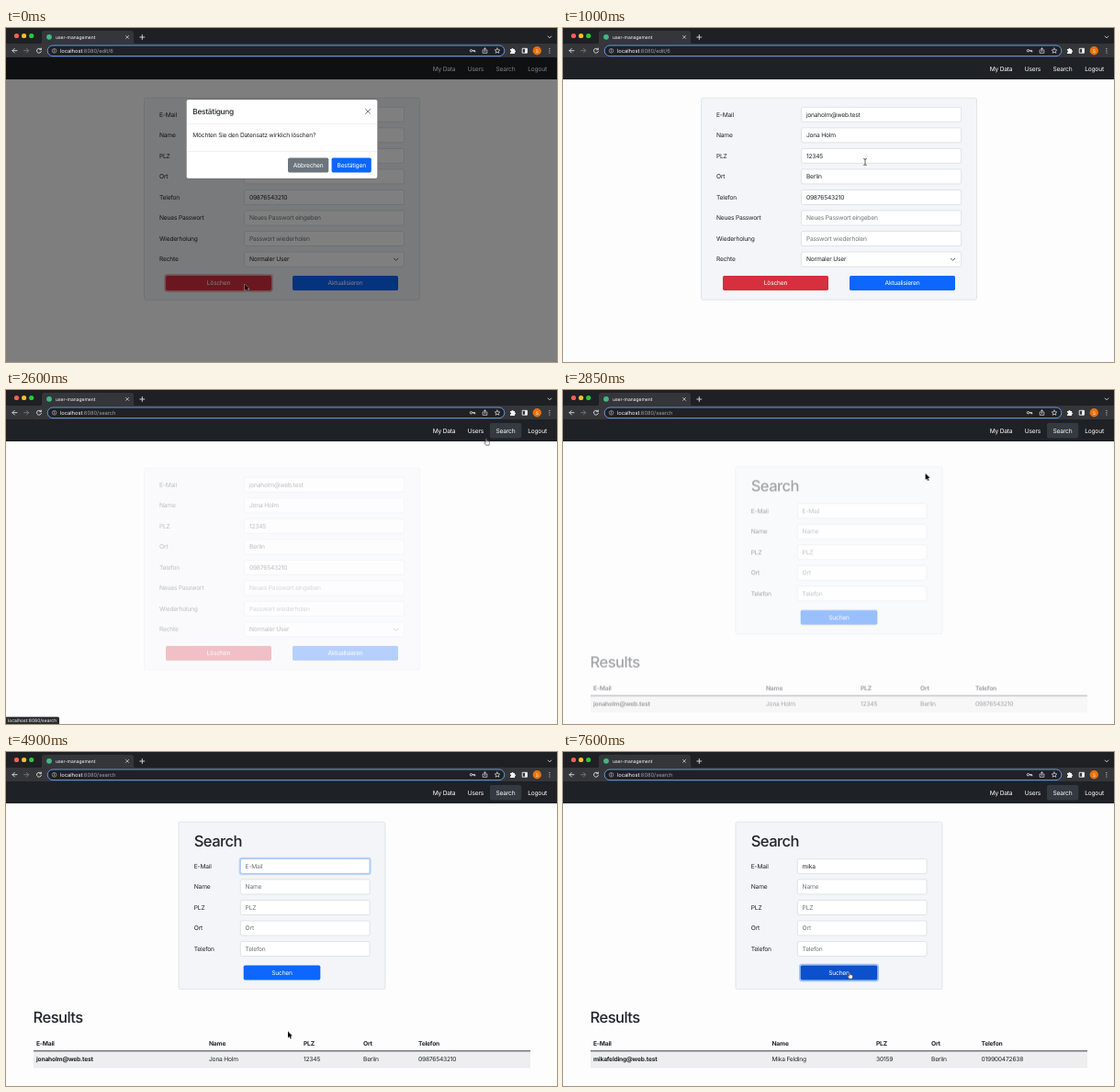
These frames come from a looping animation (600 px wide and 364 px high, 8 s). An HTML page:

```html
<!DOCTYPE html>
<html lang="de">
<head>
<meta charset="utf-8">
<title>user-management</title>
<style>
html, body { margin: 0; width: 100%; height: 100%; overflow: hidden; background: #fdfdfe; }
svg { display: block; width: 600px; height: 364px; }
text { font: 6.66px Inter, "Open Sans", sans-serif; letter-spacing: -.03em; fill: #212529; text-rendering: geometricPrecision; white-space: pre; }
.mid { text-anchor: middle; }
.white { fill: #fff; }
.hint { fill: #6c757d; }
.bold { font-weight: 700; }
.head { font-size: 16.6px; font-weight: 500; letter-spacing: -.035em; }
.title { font-size: 8.3px; font-weight: 500; }
.tiny { font-size: 5px; letter-spacing: 0; }
.url { font-size: 5.8px; letter-spacing: -.01em; }
.card { fill: #f3f5f8; stroke: #d4d7db; stroke-width: .6; }
.field { fill: #fff; stroke: #ced4da; stroke-width: .6; }
.line { fill: none; stroke-linecap: round; stroke-linejoin: round; }

/* One shared 8 s clock: 1% = 80 ms */
.run, .cut { animation: 8s linear infinite; }
.cut { animation-timing-function: step-end; }

#modal { animation-name: modal; }
@keyframes modal { 0%, 10.9% { opacity: 1; visibility: visible } 12.3%, 100% { opacity: 0; visibility: hidden } }
#ring { animation-name: ring; }
@keyframes ring { 0%, 10.9% { opacity: 1 } 12.3%, 100% { opacity: 0 } }
#cancel { animation-name: cancel; }
@keyframes cancel { 0%, 7.4% { fill: #6c757d } 9.2%, 100% { fill: #5c636a } }

#edit { animation-name: edit; }
@keyframes edit {
  0%, 30.94% { opacity: 1; transform: none; animation-timing-function: ease }
  34.69%, 100% { opacity: 0; transform: translateY(12.5px) }
}
#search { animation-name: search; }
@keyframes search {
  0%, 34.69% { opacity: 0; transform: translateY(12.5px); animation-timing-function: ease }
  38.44%, 100% { opacity: 1; transform: none }
}
#tab { animation-name: tab; }
@keyframes tab { 0%, 28.6% { opacity: 0 } 30.5%, 100% { opacity: 1 } }
#status { animation-name: status; }
@keyframes status { 0%, 28.8% { opacity: 0 } 29.6%, 33.5% { opacity: 1 } 35.5%, 100% { opacity: 0 } }
#pathA { animation-name: pathA; }
@keyframes pathA { 0% { opacity: 1 } 30.9%, 100% { opacity: 0 } }
#pathB { animation-name: pathB; }
@keyframes pathB { 0% { opacity: 0 } 30.9%, 100% { opacity: 1 } }

#focus { animation-name: focus; }
@keyframes focus { 0%, 42.2% { opacity: 0 } 44.2%, 91.9% { opacity: 1 } 93.8%, 100% { opacity: 0 } }
#caret { animation-name: caret; }
@keyframes caret {
  0% { opacity: 0; transform: none }
  41.9% { opacity: 1 }
  48.75% { opacity: 0 }
  55% { opacity: 1 }
  61.25% { opacity: 0; transform: none }
  63.12% { opacity: 1; transform: translateX(6px) }
  64.38% { transform: translateX(7.6px) }
  65.8% { transform: translateX(11px) }
  67.1% { opacity: 1; transform: translateX(14.8px) }
  73.1% { opacity: 0 }
  79.4% { opacity: 1 }
  85.5%, 100% { opacity: 0; transform: translateX(14.8px) }
}
#hint { animation-name: hint; }
@keyframes hint { 0% { opacity: 1 } 63.12%, 100% { opacity: 0 } }
#k0 { animation-name: k0; }
#k1 { animation-name: k1; }
#k2 { animation-name: k2; }
#k3 { animation-name: k3; }
@keyframes k0 { 0% { fill-opacity: 0 } 63.12%, 100% { fill-opacity: 1 } }
@keyframes k1 { 0% { fill-opacity: 0 } 64.38%, 100% { fill-opacity: 1 } }
@keyframes k2 { 0% { fill-opacity: 0 } 65.8%, 100% { fill-opacity: 1 } }
@keyframes k3 { 0% { fill-opacity: 0 } 67.1%, 100% { fill-opacity: 1 } }

#go { animation-name: go; }
@keyframes go { 0%, 90% { fill: #0d66fd } 91.9%, 100% { fill: #0b50cc } }
#goRing { animation-name: goRing; }
@keyframes goRing { 0%, 91.9% { opacity: 0 } 93.8%, 100% { opacity: 1 } }
#rowA { animation-name: rowA; }
@keyframes rowA { 0% { opacity: 1 } 93.6%, 100% { opacity: 0 } }
#rowB { animation-name: rowB; }
@keyframes rowB { 0% { opacity: 0 } 93.6%, 100% { opacity: 1 } }

#cursor { animation-name: move; }
@keyframes move {
  0%, .4% { transform: translate(260px, 279px); animation-timing-function: ease-in-out }
  9.2%, 20.3% { transform: translate(329px, 146px); animation-timing-function: ease-in-out }
  29.4%, 31% { transform: translate(539px, 45px); animation-timing-function: ease-in }
  32.5% { transform: translate(523.5px, 52.5px); animation-timing-function: ease-out }
  40.6%, 52.3% { transform: translate(291.5px, 121.5px); animation-timing-function: ease-in-out }
  60.6%, 74.8% { transform: translate(307px, 304.5px); animation-timing-function: ease-in-out }
  83.5%, 85% { transform: translate(334px, 350px) }
  85.63% { transform: translate(334.5px, 345.3px); animation-timing-function: ease-in-out }
  91%, 100% { transform: translate(312px, 239.8px) }
}
#arrow { animation-name: arrow; }
@keyframes arrow {
  0% { opacity: 1 } 7.4% { opacity: 0 } 21.8% { opacity: 1 } 28.1% { opacity: 0 }
  33.2% { opacity: 1 } 38.6% { opacity: 0 } 53.9% { opacity: 1 } 63.12% { opacity: 0 }
  75% { opacity: 1 } 89.6%, 100% { opacity: 0 }
}
#hand { animation-name: hand; }
@keyframes hand {
  0% { opacity: 0 } 7.4% { opacity: 1 } 11.6% { opacity: 0 } 28.1% { opacity: 1 }
  33.2% { opacity: 0 } 89.6%, 100% { opacity: 1 }
}
#beam { animation-name: beam; }
@keyframes beam {
  0% { opacity: 0 } 11.6% { opacity: 1 } 21.8% { opacity: 0 } 38.6% { opacity: 1 } 53.9%, 100% { opacity: 0 }
}
</style>
</head>
<body>
<script>
const attrs = (id, cls) => (id ? ` id="${id}"` : '') + (cls ? ` class="${cls}"` : '');
const text = (x, y, s, cls = '', id = '') => `<text x="${x}" y="${y}"${attrs(id, cls)}>${s}</text>`;
const rect = (x, y, w, h, r, fill, cls = '', id = '') =>
  `<rect x="${x}" y="${y}" width="${w}" height="${h}" rx="${r}"${fill ? ` fill="${fill}"` : ''}${attrs(id, cls)}/>`;
const circle = (x, y, r, fill) => `<circle cx="${x}" cy="${y}" r="${r}" fill="${fill}"/>`;
const line = (d, color, w = .9) => `<path class="line" d="${d}" stroke="${color}" stroke-width="${w}"/>`;
const group = (id, cls, ...parts) => `<g${attrs(id, cls)}>${parts.join('')}</g>`;
const button = (x, y, w, label, fill, cls = '', id = '') =>
  rect(x, y, w, 16, 1.7, fill, cls, id) + text(x + w / 2, y + 10.4, label, 'mid white');
const ring = (x, y, w, h, color, id, cls) => `<rect x="${x - .8}" y="${y - .8}" width="${w + 1.6}" height="${h + 1.6}"
  rx="2.3" fill="none" stroke="${color}" stroke-width="1.7"${attrs(id, cls)}/>`;

const PITCH = 22.54;
const rows = (list, top, labelX, x, w) => list.map(([label, value, hint], i) => {
  const y = top + i * PITCH;
  return text(labelX, y + 2.4, label) + rect(x, y - 8, w, 16, 1.7, '', 'field') +
    (value ? text(x + 5.3, y + 2.4, value) : '') + (hint ? text(x + 5.3, y + 2.4, hint, 'hint') : '');
}).join('');

const cells = (y, xs, values, cls) => values.map((v, i) => text(xs[i], y, v, i ? cls : 'bold')).join('');
const result = (id, xs, values) => group(id, 'cut',
  cells(319.6, xs, ['E-Mail', 'Name', 'PLZ', 'Ort', 'Telefon'], 'bold'), cells(337.4, xs, values, ''));

const edit = group('edit', 'run',
  rect(150.5, 76.2, 300, 220, 2, '', 'card'),
  rows([
    ['E-Mail', 'jonaholm@web.test'], ['Name', 'Jona Holm'], ['PLZ', '12345'], ['Ort', 'Berlin'],
    ['Telefon', '09876543210'], ['Neues Passwort', '', 'Neues Passwort eingeben'],
    ['Wiederholung', '', 'Passwort wiederholen'], ['Rechte', 'Normaler User']
  ], 94.3, 167, 259.6, 174),
  line('M422.4 251.2l2.2 2.1 2.2-2.1', '#343a40', .8),
  ring(174, 270, 115, 16, '#e9a3aa', 'ring', 'run'),
  button(174, 270, 115, 'Löschen', '#d62f3e'),
  button(312, 270, 115, 'Aktualisieren', '#0d66fd'));

const typed = [...'mika'].map((c, i) => `<tspan id="k${i}" class="cut">${c}</tspan>`).join('');
const search = group('search', 'run',
  rect(188, 76.2, 225, 182.5, 2, '', 'card'),
  text(204.7, 102.8, 'Search', 'head'),
  rows([['E-Mail'], ['Name', '', 'Name'], ['PLZ', '', 'PLZ'], ['Ort', '', 'Ort'], ['Telefon', '', 'Telefon']],
    124.4, 204.8, 255.3, 140.7),
  group('focus', 'run', ring(255.3, 116.4, 140.7, 16, '#bcd6fe'),
    '<rect x="255.3" y="116.4" width="140.7" height="16" rx="1.7" fill="#fff" stroke="#86b7fe" stroke-width=".7"/>'),
  text(260.6, 126.8, 'E-Mail', 'hint cut', 'hint'),
  text(260.6, 126.8, typed),
  rect(260.2, 120.6, .6, 7.8, 0, '#212529', 'cut', 'caret'),
  ring(258.7, 232.5, 83.6, 16, '#9fc2fb', 'goRing', 'run'),
  button(258.7, 232.5, 83.6, 'Suchen', '#0d66fd', 'run', 'go'),
  text(29.6, 295, 'Results', 'head'),
  rect(30, 326, 541, 18, 0, '#eeeeef'),
  rect(30, 325.4, 541, .9, 0, '#212529'),
  rect(30, 343.7, 541, .4, 0, '#dee2e6'),
  result('rowA', [33, 221, 324, 389, 449], ['jonaholm@web.test', 'Jona Holm', '12345', 'Berlin', '09876543210']),
  result('rowB', [33, 227.5, 341, 401, 455.5], ['mikafelding@web.test', 'Mika Felding', '30159', 'Berlin', '019900472638']));

const nav = rect(0, 32, 600, 24, 0, '#1e2125') + rect(527, 36, 34.3, 16.5, 1.8, '#343a40', 'run', 'tab') +
  [[477, 'My Data'], [511.4, 'Users'], [544, 'Search'], [578.5, 'Logout']].map(([x, s]) => text(x, 46.6, s, 'mid white')).join('');

const modal = group('modal', 'run',
  '<rect y="32" width="600" height="332" opacity=".5"/>',
  '<rect x="196.5" y="78" width="208" height="86" rx="2" fill="#fff" stroke="#000" stroke-opacity=".3" stroke-width=".5"/>',
  text(203.2, 94.1, 'Bestätigung', 'title'),
  line('M391.6 88.4l5 5m0-5l-5 5', '#555', .8),
  rect(196.7, 104, 207.6, .5, 0, '#dee2e6'),
  text(203.2, 118.6, 'Möchten Sie den Datensatz wirklich löschen?'),
  rect(196.7, 134.3, 207.6, .5, 0, '#dee2e6'),
  button(307, 141.5, 44.3, 'Abbrechen', '', 'run', 'cancel'),
  button(354.6, 141.5, 43.2, 'Bestätigen', '#0d66fd'));

const pale = '#dfe1e5', dim = '#9aa0a6';
const url = (id, path) => `<text x="59" y="26.8" class="url cut" id="${id}" style="fill:${dim}"><tspan fill="#fff">localhost</tspan>:8080/${path}</text>`;
const chrome = [
  rect(0, 0, 600, 17.5, 0, '#1f2023'),
  '<path d="M36 17.5q3 0 3-3V6q0-3 3-3h94q3 0 3 3v8.500q0 3 3 3z" fill="#35363a"/>',
  rect(0, 17, 600, 15, 0, '#35363a'),
  circle(11.5, 8.5, 2.6, '#ff5f57'), circle(19.6, 8.5, 2.6, '#febc2e'), circle(27.7, 8.5, 2.6, '#28c840'),
  circle(47, 9.8, 2.9, '#41b883'),
  `<text x="54" y="11.6" class="tiny white">user-management</text>`,
  line('M130.600 8.400l3 3m0-3l-3 3', pale, .7),
  line('M145.800 10h5m-2.500-2.500v5', pale),
  line('M590.200 9l1.800 1.800 1.800-1.800', pale),
  line('M12 24.700H7m2.300-2.300L7 24.700l2.300 2.300', pale),
  line('M19.700 24.700h5m-2.300-2.300l2.300 2.300-2.300 2.300', '#77797d'),
  line('M38 23.200a2.500 2.500 0 1 0 .4 2.300M38.300 22v1.700h-1.700', pale),
  '<rect x="45.200" y="19" width="497.600" height="11.600" rx="5.800" fill="#202124" stroke="#6296e8" stroke-width="1"/>',
  '<circle cx="52.600" cy="24.800" r="2.300" fill="none" stroke="#bdc1c6" stroke-width=".6"/>',
  line('M52.600 24.600v1.200m0-2.300v.05', '#bdc1c6', .7),
  url('pathA', 'edit/6'), url('pathB', 'search'),
  '<circle cx="506.500" cy="24.700" r="1.200" fill="none" stroke="#dfe1e5" stroke-width=".9"/>',
  line('M507.800 24.700h3v1.200m-1.200-1.200v1', pale),
  line('M520.200 24h-1v3.300h4.600V24h-1M521.500 25.700v-3.900m-1.300 1.300l1.300-1.300 1.300 1.300', pale, .7),
  line('M535 22l.8 1.800 2 .2-1.500 1.300.5 2-1.800-1.100-1.800 1.100.5-2-1.500-1.300 2-.2z', pale, .7),
  '<path d="M549 23h1.500a1 1 0 0 1 2 0h1.500v1.500a1 1 0 0 1 0 2V28h-5v-1.500a1 1 0 0 0 0-2z" fill="#f1f3f4"/>',
  line('M562.600 22.300h4.800v4.900h-4.800z', '#f1f3f4'), rect(565.1, 22.3, 2.4, 4.9, 0, '#f1f3f4'),
  circle(578.3, 24.8, 4.7, '#e8710a'), text(578.3, 26.6, 'S', 'mid white tiny'),
  ...[22.6, 24.8, 27].map(y => circle(591.9, y, .6, pale))
].join('');

const status = group('status', 'run', rect(-2, 356.3, 60, 10, 1.5, '#292a2d'), text(2, 362.2, 'localhost:8080/search', 'tiny white'));

const beam = 'M-1.400-3.500Q0-3.500 0-2.600Q0-3.500 1.400-3.500M0-2.600V2.600M-1.400 3.500Q0 3.500 0 2.600Q0 3.500 1.400 3.500';
const cursor = group('cursor', 'run',
  '<path id="arrow" class="cut" d="M0 0V7l1.600-1.500 1.100 2.500 1.200-.5-1.100-2.400H5z" stroke="#fff" stroke-width=".6" paint-order="stroke"/>',
  '<path id="hand" class="cut" d="M-.6.600Q0-.3.600.600V3q.6-.5 1.100.1.600-.4 1 .2.900-.2.900.8v1.400l-.6 1.900H-.3L-2.300 4.500q.1-.9.900-.6l.8.700z" fill="#fff" stroke="#111" stroke-width=".55" stroke-linejoin="round"/>',
  group('beam', 'cut', line(beam, '#fff', 1.2), line(beam, '#111', .65)));

document.body.innerHTML = `<svg viewBox="0 0 600 364">
  ${rect(0, 0, 600, 364, 0, '#fdfdfe')}${edit}${search}${nav}${modal}${chrome}${status}${cursor}</svg>`;
</script>
</body>
</html>
```
